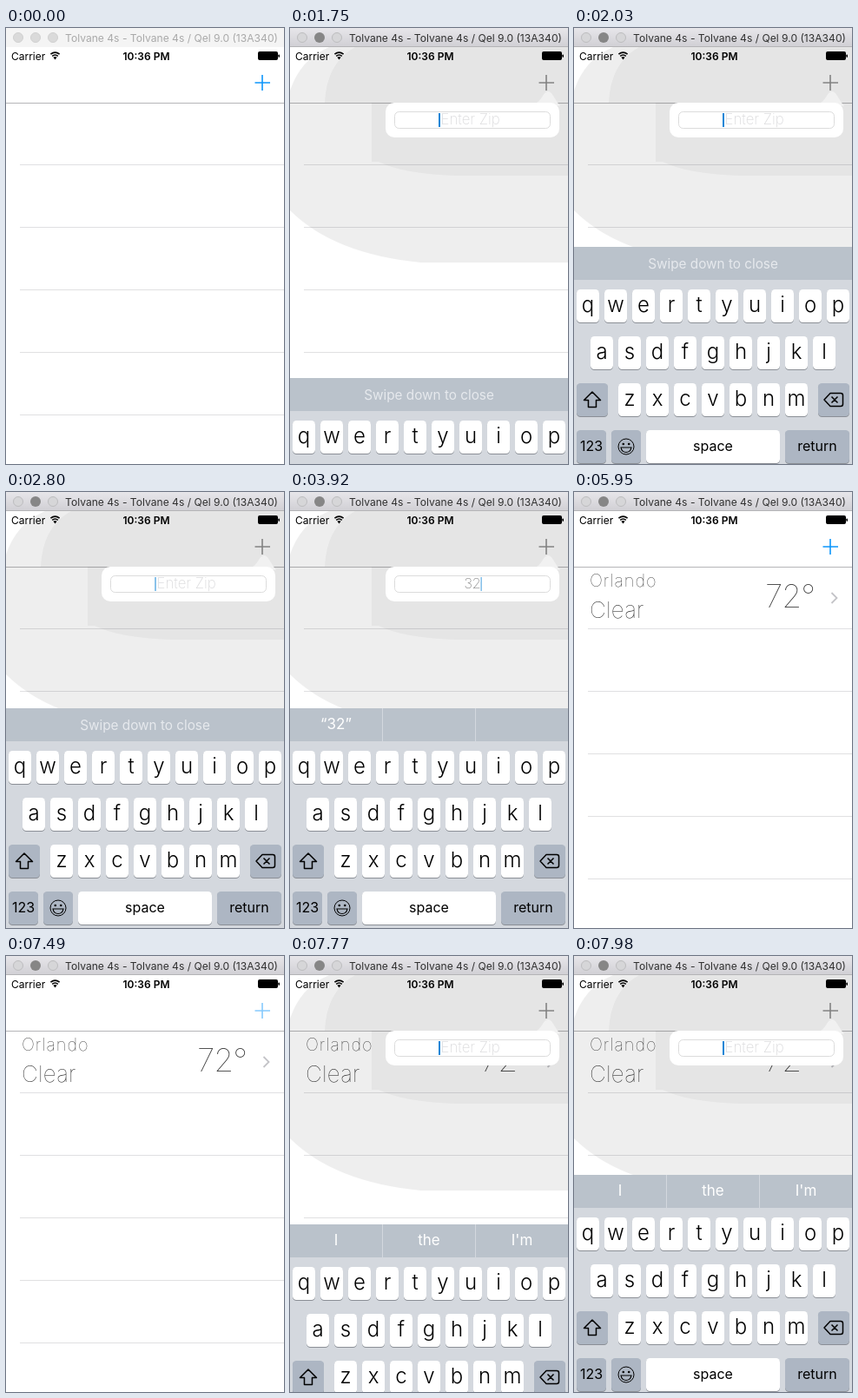
These frames come from a looping animation (320 by 502 pixels, 8 s). An HTML page:

```html
<!DOCTYPE html>
<html lang="en">
<head>
<meta charset="utf-8">
<title>Weather by zip</title>
<style>
html, body { margin: 0; width: 100%; height: 100%; overflow: hidden; background: #fff; }
svg { display: block; width: 100%; height: 100%; font-family: Inter, Roboto, sans-serif; }
.mid { text-anchor: middle; }
.thin { font-weight: 100; fill: #333; }
.key { font-size: 24px; font-weight: 340; }
.label { font-size: 16px; }
.bar { font-size: 17px; fill: #fff; }
</style>
</head>
<body>
<svg id="stage" viewBox="0 0 320 502"></svg>
<script>
const LOOP = 8000, STEP = 70;
const POP_IN = 1675, POP_OUT = 4900, KEYS_OUT = 5390, POP_AGAIN = 7617;
const KEYS_TOP = 249, KEYS_H = 253;
const BLUE = '#0d96fb';

const rect = (x, y, w, h, fill, r = 0, more = '') =>
  `<rect x="${x}" y="${y}" width="${w}" height="${h}" rx="${r}" fill="${fill}" ${more}/>`;
const text = (x, y, str, cls = '', more = '') =>
  `<text x="${x}" y="${y}" class="${cls}" ${more}>${str}</text>`;
const line = (d, stroke, w = 1, more = '') =>
  `<path d="${d}" fill="none" stroke="${stroke}" stroke-width="${w}" ${more}/>`;
const dot = (x, y, r, fill, stroke = 'none') =>
  `<circle cx="${x}" cy="${y}" r="${r}" fill="${fill}" stroke="${stroke}"/>`;
const group = (id, body) => `<g id="${id}">${body}</g>`;

function titleBar() {
  const title = color => text(190.5, 16, 'Tolvane 4s - Tolvane 4s / Qel 9.0 (13A340)', 'mid',
    `font-size="12.1" fill="${color}"`);
  const idle = rect(0, 0, 320, 22, '#f4f4f4') +
    [14, 34, 54].map(x => dot(x, 11, 5.5, '#dadada', '#d0d0d0')).join('') + title('#a9a9a9');
  const active = rect(0, 0, 320, 22, 'url(#chrome)') + rect(0, 21, 320, 1, '#b4b4b6') +
    [14, 54].map(x => dot(x, 11, 5.5, '#d6d6d8', '#bdbdbf')).join('') +
    dot(34, 11, 6, '#868686') + title('#303030');
  return group('idle', idle) + group('active', active);
}

function statusBar() {
  const wifi = line('M51.4 30.2Q56.5 26 61.6 30.2M53.2 32.4Q56.5 29.6 59.8 32.4', '#000', 1.6) +
    '<path d="M54.4 33.8Q56.5 32.2 58.6 33.8L56.5 36.4Z"/>';
  const battery = rect(290, 27, 23, 10, '#000', 2) + rect(313.4, 30.5, 1.6, 3.4, '#000', .8);
  return text(6, 36.5, 'Carrier', '', 'font-size="12"') + wifi + battery +
    text(161.5, 36.5, '10:36 PM', 'mid', 'font-size="12" font-weight="600"');
}

function table() {
  let out = rect(0, 86, 320, 1, '#b6b6b8');
  for (let y = 157; y < 500; y += 72) out += rect(16, y, 304, 1, '#e0e0e2');
  return out;
}

function weatherRow() {
  return text(18, 109, 'Orlando', 'thin', 'font-size="20" letter-spacing=".9"') +
    text(18, 145, 'Clear', 'thin', 'font-size="26" letter-spacing=".2"') +
    text(277, 133, '72°', 'thin', 'font-size="37" letter-spacing="-1" text-anchor="end"') +
    line('M296.5 116L302.5 122L296.5 128', '#c4c4c8', 1.8);
}

function popover() {
  return '<path d="M0 72Q12 36 45 22H320V270H150Q50 260 0 210Z" fill="#000" opacity=".067"/>' +
    '<path d="M40 86Q42 40 75 22H320V170H190Q130 168 102 154H94V86Z" fill="#000" opacity=".04"/>' +
    '<path d="M282 87Q287 85 291 78Q297 68 303 78Q307 85 311 90Z" fill="#f1f1f1"/>' +
    rect(110, 86, 200, 40, '#fff', 10) +
    rect(120.5, 96.5, 179, 19, '#fff', 5, 'stroke="#dcdcdc"') +
    text(173.5, 111, 'Enter Zip', '', 'id="hint" font-size="16.8" font-weight="200" fill="#dadadc"') +
    text(210, 111, '', 'mid thin', 'id="zip" font-size="16"') +
    rect(171, 98, 2, 16, '#1486d6', 0, 'id="caret"');
}

function keyboard() {
  const key = (x, y, w, label, cls, fill = '#fff') =>
    rect(x, y + 1, w, 38, '#8b8f96', 4.5) + rect(x, y, w, 38, fill, 4.5) +
    text(x + w / 2, y + (cls === 'key' ? 26 : 24), label, 'mid ' + cls);
  const gray = '#adb6c3';
  let out = rect(0, 0, 320, 260, '#d4d8de') + rect(0, 0, 320, 38, '#bac2cb');
  [['qwertyuiop', 3], ['asdfghjkl', 19], ['zxcvbnm', 51]].forEach(([row, x], r) => {
    [...row].forEach((c, i) => out += key(x + 32 * i, 49 + 54 * r, 26, c, 'key'));
  });
  out += key(3, 157, 36, '', '', gray) + key(281, 157, 36, '', '', gray) +
    key(3, 211, 34, '123', 'label', gray) + key(43, 211, 34, '', '', gray) +
    key(83, 211, 154, 'space', 'label') + key(243, 211, 74, 'return', 'label', gray);
  out += line('M21 167L30.5 176.5H25.5V184.5H16.5V176.5H11.5Z', '#000', 1.5, 'stroke-linejoin="round"');
  out += line('M295 168.5H307Q309.5 168.5 309.5 171V181Q309.5 183.5 307 183.5H295L288 176Z' +
    'M296.5 172.5L303.5 179.5M303.5 172.5L296.5 179.5', '#000', 1.5, 'stroke-linejoin="round"');
  out += dot(60, 230, 9, 'none', '#000') + dot(56.8, 227, 1.3, '#000') + dot(63.2, 227, 1.3, '#000') +
    line('M54 231H66Q65 236.5 60 236.5Q55 236.5 54 231Z', '#000', 1.2);
  out += text(160, 24.5, 'Swipe down to close', 'mid', 'id="tip" font-size="15.3" fill="#e6e9ed"');
  out += group('words', line('M106.5 0V38M213.5 0V38', '#d3d8de') +
    [53, 160, 267].map((x, i) => text(x, 23.5, '', 'mid bar', `id="word${i}"`)).join(''));
  return out;
}

const stage = document.getElementById('stage');
stage.innerHTML = '<defs><linearGradient id="chrome" x2="0" y2="1">' +
  '<stop stop-color="#e7e6ea"/><stop offset="1" stop-color="#d0cfd4"/></linearGradient></defs>' +
  rect(0, 0, 320, 502, '#fff') + table() + group('row', weatherRow()) +
  group('pop', popover()) + statusBar() +
  line('M286.5 63H304M295 54V72', BLUE, 1.6, 'id="plus"') +
  group('keys', keyboard()) + titleBar();

const el = id => document.getElementById(id);
const set = (id, name, value) => el(id).setAttribute(name, value);
const fade = (id, value) => set(id, 'opacity', value);
const write = (id, str) => { el(id).textContent = str; };
const ramp = (t, start, span) => Math.min(1, Math.max(0, (t - start) / span));

// Critically damped spring: 1 at the start, settling to 0.
const spring = ms => {
  const x = Math.max(0, ms) * .018;
  return (1 + x) * Math.exp(-x);
};
const reached = (t, times) => times.filter(at => t >= at).length;

function plusAlpha(t) {
  const [down, up] = t < 5000 ? [1050, 1190] : [7280, 7420];
  return t < down ? 1 : .25 + .75 * ramp(t, up - STEP, 420);
}

function caretAlpha(t) {
  if (t < 3150) return 1 - ramp(t, 2730, 140);
  if (t < 3990) return 1 - .5 * ramp(t, 3780, 140);
  return 1;
}

function draw(t) {
  const second = t >= POP_AGAIN;
  const open = second || t >= POP_IN && t < POP_OUT;
  const pop = second ? 1 : t < POP_IN ? 0 : 1 - ramp(t, POP_OUT - STEP, 350);

  fade('idle', t < 1050 ? 1 : 0);
  fade('active', t < 1050 ? 0 : 1);
  fade('pop', pop);
  fade('row', ramp(t, KEYS_OUT - STEP, 210));
  set('plus', 'stroke', open ? '#828282' : BLUE);
  fade('plus', open ? 1 : plusAlpha(t));

  const hidden = second ? spring(t - POP_AGAIN)
    : t >= KEYS_OUT ? 1 - spring(t - KEYS_OUT)
    : spring(t - POP_IN);
  set('keys', 'transform', `translate(0 ${Math.round(KEYS_TOP + KEYS_H * hidden)})`);

  const code = '32801';
  const typed = second ? 0 : reached(t, [3150, 3290, 3990, 4340, 4480]);
  write('zip', code.slice(0, typed));
  fade('hint', typed ? 0 : 1);
  set('caret', 'x', typed ? 210 + 4.7 * typed : 171);
  set('caret', 'width', typed ? 1.6 : 2);
  fade('caret', second ? 1 : caretAlpha(t));

  const swap = second ? 1 : ramp(t, 3570, 210);
  const quoted = [2, 3, 4, 5][reached(t, [4130, 4340, 4690])];
  const words = second ? ['I', 'the', "I'm"] : [`“${code.slice(0, quoted)}”`, '', ''];
  words.forEach((w, i) => write('word' + i, w));
  fade('words', swap);
  fade('tip', 1 - swap);
}

function tick() {
  const t = performance.now() % LOOP;
  draw(Math.floor(t / STEP) * STEP);
  requestAnimationFrame(tick);
}
tick();
</script>
</body>
</html>
```
